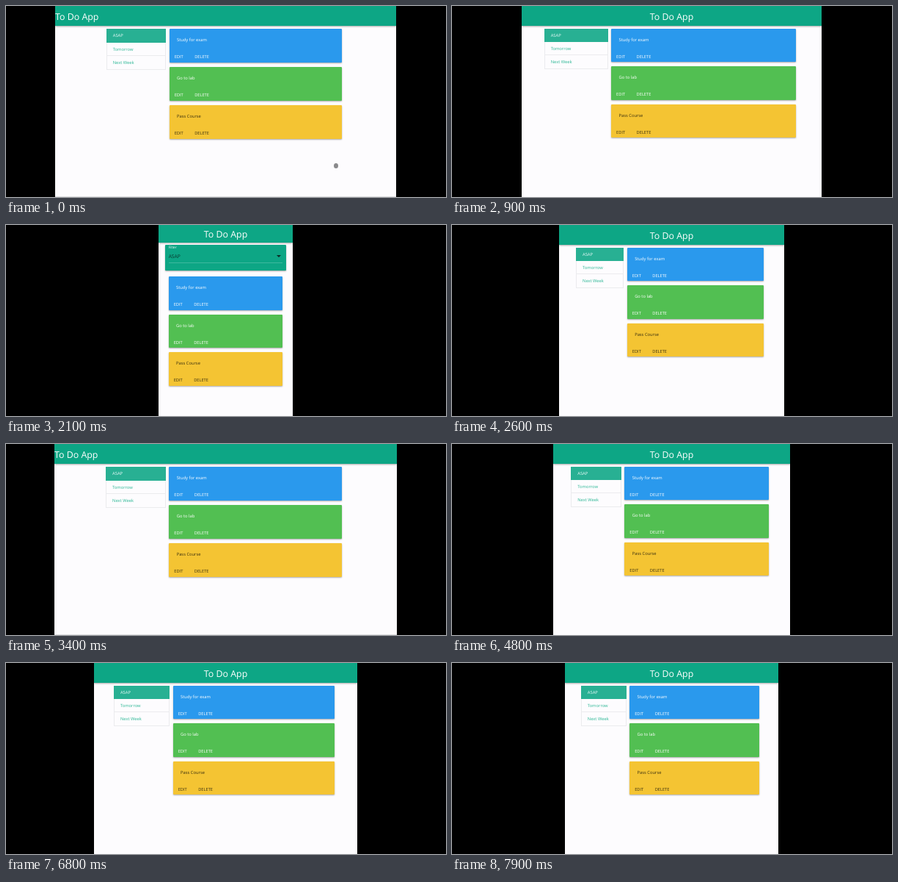
Animation, 600 px wide and 260 px high, one loop 8 s. Source, as an HTML page:

```html
<!DOCTYPE html>
<html lang="en">
<head>
<meta charset="utf-8">
<title>To Do App</title>
<style>
html, body { margin: 0; width: 100%; height: 100%; overflow: hidden; background: #000; }
body { position: relative; font: 500 5.8px "Open Sans", "Noto Sans", sans-serif; text-rendering: geometricPrecision; }
div, span { position: absolute; box-sizing: border-box; white-space: nowrap; }

#app {
  --nav: 27.4px; --top: 31px; --pitch: 51.4px; --item: 18.2px; --margin: 7.5%;
  top: 0; height: 260px; background: #fdfcfe; overflow: hidden;
}
#app.wide { --pitch: 52px; --item: 18.5px; --margin: 15%; border-bottom: 1px solid #e2e2e4; }
#app.phone { --nav: 24.4px; --top: 70.4px; --margin: 5%; }

.nav {
  width: 100%; height: var(--nav); line-height: calc(var(--nav) + 2.5px);
  background: #0da685; color: #fff; font-size: 12.4px; text-align: center;
  box-shadow: 0 1px 2px #0005;
}
.wide .nav { text-align: left; }
.box { left: var(--margin); right: var(--margin); top: 0; height: 260px; }

.list { left: 0; top: var(--top); width: 25%; height: calc(3 * var(--item)); border: 1px solid #ebebee; }
.list div {
  left: -1px; right: -1px; top: calc(var(--i) * var(--item) - 1px); height: var(--item);
  line-height: calc(var(--item) + 1px); padding-left: 9px; color: #2bb795; border-bottom: 1px solid #ebebee;
}
.list div:first-child { background: #28b093; color: #eafaf9; border: 0; }
.phone .list { display: none; }

.card, .filter { border-radius: 1px; box-shadow: 0 1px 2px #0005; line-height: 8px; }
.card {
  left: calc(25% + 4.5px); right: 4.5px; top: calc(var(--top) + var(--i) * var(--pitch));
  height: calc(var(--pitch) - 6px);
}
.phone .card { left: 4.5px; }
.card span { left: 10.4px; top: 11px; }
.card .edit, .card .delete { left: 7px; top: 34px; font-size: 5.7px; }
.card .delete { left: 34.5px; }

.filter { display: none; left: 0; right: 0; top: 27.4px; height: 34.4px; background: #0da685; }
.phone .filter { display: block; }
.label { left: 4.5px; top: 0; color: #fff; font-size: 4.7px; }
.choice { left: 4.5px; top: 11.5px; color: #0b3b31; font-size: 6.7px; }
.arrow { right: 7px; top: 14px; border: 3px solid transparent; border-top-color: #0b2b25; border-bottom: 0; }
.line { left: 4.5px; right: 4.5px; top: 24px; height: 1px; background: #fff3; }

#cursor { width: 6px; height: 7px; margin: -3.5px -3px; border-radius: 50%; background: #8a8a8c; }
</style>
</head>
<body>
<div id="app">
  <div class="nav">To Do App</div>
  <div class="box">
    <div class="filter">
      <span class="label">Filter</span><span class="choice">ASAP</span>
      <div class="arrow"></div><div class="line"></div>
    </div>
    <div class="list">
      <div style="--i:0">ASAP</div><div style="--i:1">Tomorrow</div><div style="--i:2">Next Week</div>
    </div>
    <div id="cards"></div>
  </div>
</div>
<div id="cursor"></div>
<script>
const app = document.getElementById('app');
const cursor = document.getElementById('cursor');

document.getElementById('cards').outerHTML = [
  ['Study for exam', '#2a99ed', '#fff'],
  ['Go to lab', '#52bf52', '#fff'],
  ['Pass Course', '#f4c433', '#3a3010']
].map(([text, fill, ink], i) =>
  `<div class="card" style="--i:${i};background:${fill};color:${ink}"><span>${text}</span>
   <span class="edit">EDIT</span><span class="delete">DELETE</span></div>`).join('');

// Turning points of the window drag: time, width.
const turns = [
  [0, 465], [700, 465], [1400, 181], [1600, 162], [1850, 162], [3400, 467], [3800, 467], [4800, 323],
  [5600, 223], [6100, 223], [6200, 229], [6300, 229], [7060, 408], [7300, 408], [7900, 291], [8000, 291]
];

function widthAt(t) {
  const i = turns.findIndex(([time]) => time > t);
  const [t0, w0] = turns[i - 1], [t1, w1] = turns[i];
  const p = (t - t0) / (t1 - t0);
  return w0 + (w1 - w0) * p * p * (3 - 2 * p);
}

function draw() {
  const t = Math.floor(performance.now() % 8000 / 100) * 100;
  const left = Math.round(299.5 - widthAt(t) / 2);
  const width = 599 - 2 * left;
  app.style.left = left + 'px';
  app.style.width = width + 'px';
  app.className = width > 417 ? 'wide' : width < 252 ? 'phone' : '';

  const p = t / 300;
  cursor.style.display = p > 1 ? 'none' : 'block';
  cursor.style.left = 449.5 + 78 * p + 'px';
  cursor.style.top = 217.5 - 78 * p + 'px';
  requestAnimationFrame(draw);
}
draw();
</script>
</body>
</html>
```
